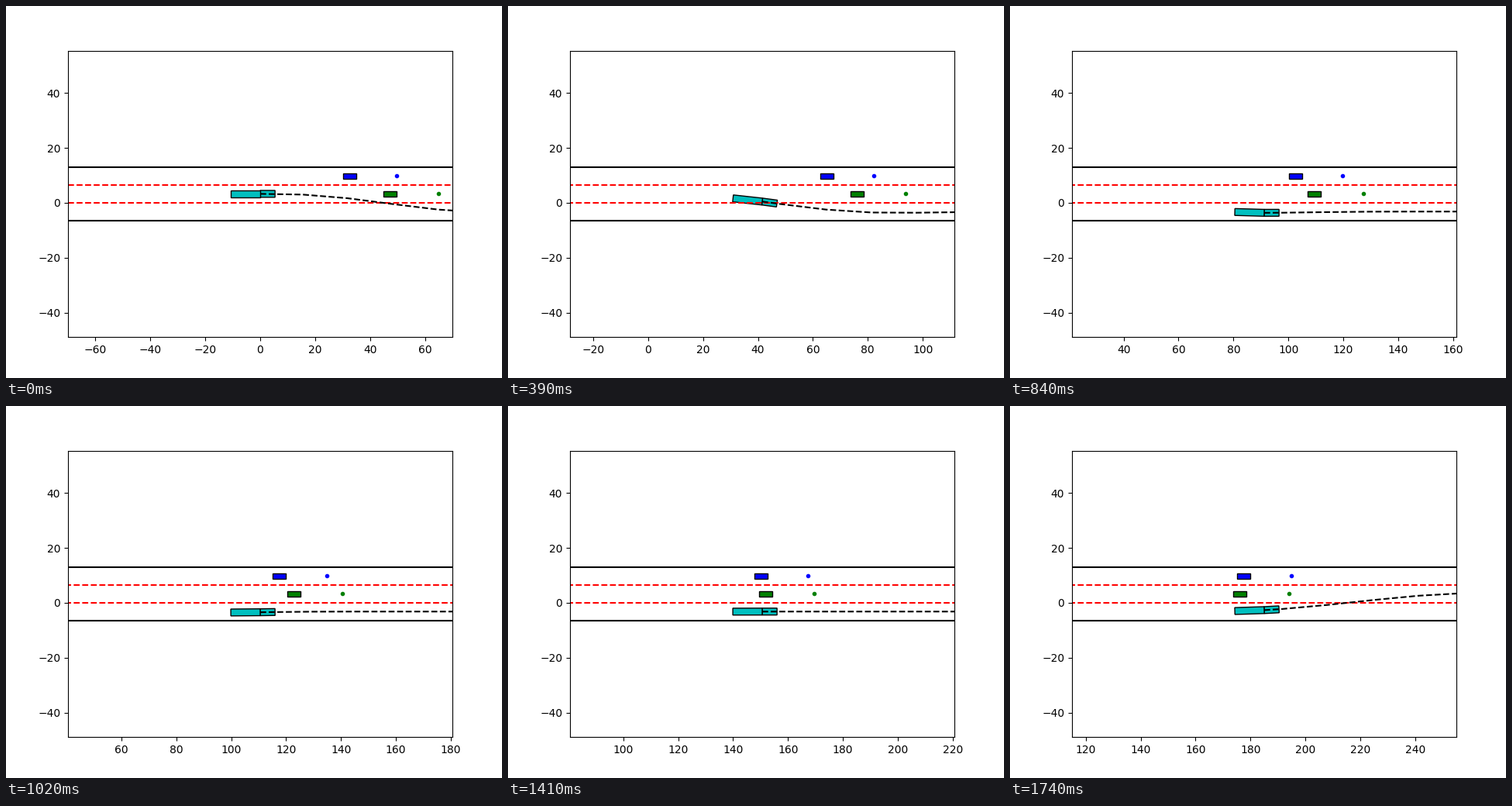
A matplotlib script for the animation above (1770 ms loop, 640 px wide and 480 px high).

```python
import numpy as np
import matplotlib.pyplot as plt
from matplotlib.animation import FuncAnimation

FRAMES, STEP, AHEAD = 59, 5, 30
HALF_X, HALF_Y, MID_Y = 70, 52.16, 3.25
TRACTOR, TRAILER, WIDTH = 5.4, 10.7, 2.5
RETURN = 50  # when the truck starts to move back


def ease(t):
    t = np.clip(t, 0, 1)
    return t * t * (3 - 2 * t)


def ease_soft(t):
    t = np.clip(t, 0, 1)
    return t ** 3 * (10 - 15 * t + 6 * t * t)


def lane_shift(t, span):
    """Swing over one lane, slightly too far, then settle."""
    settle = 0.25 * (1 + np.tanh((t - span - 5) / 5))
    return 6.95 * ease_soft(t / span) - settle


# Truck path per frame; it speeds up a little during each lane change
ticks = np.arange(FRAMES + AHEAD + STEP)
truck_x = 110 / 36 * ticks + 7 * (ease(ticks / 39) + ease((ticks - RETURN) / 39))
keep_y = MID_Y - lane_shift(ticks, 29)
truck_y = keep_y + lane_shift(ticks - RETURN, 36)
heading = np.arctan(np.gradient(truck_y) / np.gradient(truck_x))

# The trailer swings in behind the tractor
trailer_head = [0.0]
for k in range(1, FRAMES):
    lag = (heading[k] + heading[k - 1]) / 2 - trailer_head[-1]
    step = truck_x[k] - truck_x[k - 1]
    trailer_head.append(trailer_head[-1] + step / TRAILER * np.sin(lag))


def box(x, y, start, end, width, angle=0.0):
    c, s = np.cos(angle), np.sin(angle)
    u = np.array([start, end, end, start, start])
    v = np.array([-1, -1, 1, 1, -1]) * width / 2
    return np.column_stack([x + u * c - v * s, y + u * s + v * c])


def plan(k):
    """From the truck through the coming waypoints."""
    first = (k // STEP + 1) * STEP
    nodes = np.r_[k, first:first + AHEAD:STEP]
    return truck_x[nodes], (keep_y if k < RETURN else truck_y)[nodes]


fig, ax = plt.subplots(figsize=(6.4, 4.8), dpi=100)
ax.set_ylim(MID_Y - HALF_Y, MID_Y + HALF_Y)

for y, style in [(-6.5, "k-"), (0, "r--"), (6.5, "r--"), (13, "k-")]:
    ax.plot([-70, 1000], [y, y], style)


def add_body(color):
    return ax.fill([0, 1, 1, 0], [0, 0, 1, 1], fc=color, ec="k", lw=1)[0]


tractor, trailer = add_body("c"), add_body("c")
path, = ax.plot([], [], "k--")

# rear, target dot, speed, lane centre, body, dot
cars = [(rear, goal, v, y, add_body(color), ax.plot([], [], color + ".")[0])
        for rear, goal, v, y, color in [(30.2, 49.75, 90 / 36, 9.75, "b"),
                                        (44.9, 65, 80 / 36, 3.25, "g")]]


def update(k):
    x, y = truck_x[k], truck_y[k]
    tractor.set_xy(box(x, y, 0, TRACTOR, WIDTH, heading[k]))
    trailer.set_xy(box(x, y, -TRAILER, 0, WIDTH, trailer_head[k]))
    path.set_data(*plan(k))
    for rear, goal, v, lane, body, dot in cars:
        body.set_xy(box(rear + v * k, lane, 0, 4.8, 2))
        dot.set_data([goal + v * k], [lane])
    ax.set_xlim(x - HALF_X, x + HALF_X)
    return []


anim = FuncAnimation(fig, update, frames=FRAMES, interval=30, repeat=True,
                     repeat_delay=0, blit=False)
plt.show()
```
